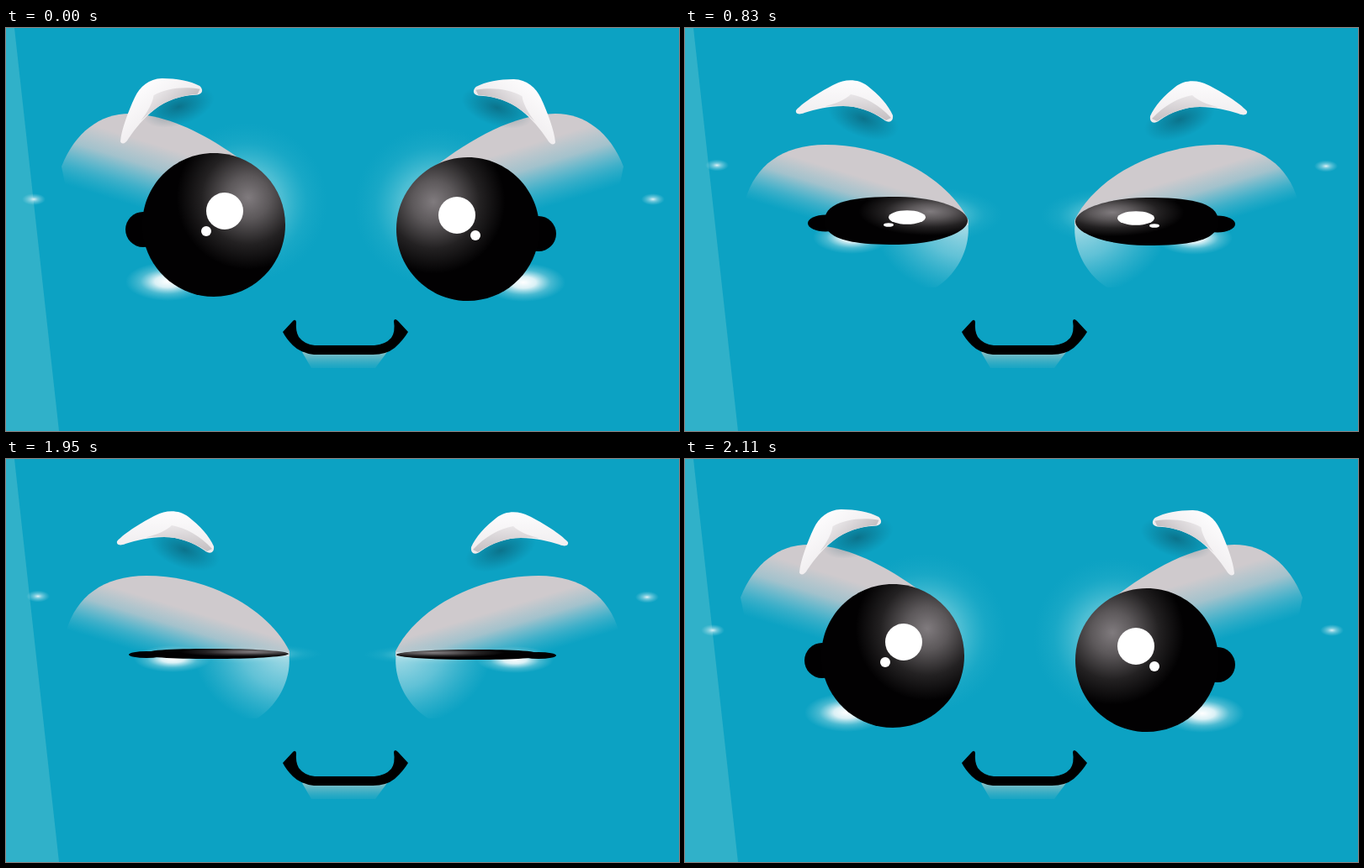
Animation of 800 by 480 pixels, one loop 2740 ms. Source, as an HTML page:

```html
<!DOCTYPE html>
<html lang="en">
<head>
<meta charset="utf-8">
<title>Blinking face</title>
<style>
  html, body { margin: 0; width: 100%; height: 100%; overflow: hidden; background: #0ca2c3; }
  svg { display: block; width: 100vw; height: 100vh; }
</style>
</head>
<body>
<svg viewBox="0 0 800 480" xmlns="http://www.w3.org/2000/svg">
  <defs>
    <radialGradient id="ball" cx=".74" cy=".31" r=".5">
      <stop offset="0" stop-color="#807b7e"/>
      <stop offset=".3" stop-color="#5c585a"/>
      <stop offset=".65" stop-color="#232122"/>
      <stop offset="1" stop-color="#020102"/>
    </radialGradient>
    <radialGradient id="halo">
      <stop offset="0" stop-color="#a5e2e8" stop-opacity=".8"/>
      <stop offset=".45" stop-color="#8ad8e2" stop-opacity=".5"/>
      <stop offset=".75" stop-color="#5cc8d8" stop-opacity=".15"/>
      <stop offset="1" stop-color="#3cbbd0" stop-opacity="0"/>
    </radialGradient>
    <radialGradient id="shine">
      <stop offset="0" stop-color="#fff"/>
      <stop offset=".3" stop-color="#fff" stop-opacity=".85"/>
      <stop offset=".65" stop-color="#e8f6f6" stop-opacity=".28"/>
      <stop offset="1" stop-color="#c0e8ec" stop-opacity="0"/>
    </radialGradient>
    <radialGradient id="glint">
      <stop offset="0" stop-color="#f4fbfc" stop-opacity=".9"/>
      <stop offset=".35" stop-color="#d8eff4" stop-opacity=".5"/>
      <stop offset="1" stop-color="#a0dce8" stop-opacity="0"/>
    </radialGradient>
    <radialGradient id="under" gradientUnits="userSpaceOnUse" cx="0" cy="0" r="1"
      gradientTransform="translate(338 228) scale(115 92)">
      <stop offset="0" stop-color="#dceff2" stop-opacity=".8"/>
      <stop offset=".5" stop-color="#c8e8ee" stop-opacity=".45"/>
      <stop offset="1" stop-color="#90d4e0" stop-opacity="0"/>
    </radialGradient>
    <radialGradient id="shade">
      <stop offset="0" stop-color="#0a2c38" stop-opacity=".4"/>
      <stop offset=".5" stop-color="#0a3c4c" stop-opacity=".22"/>
      <stop offset="1" stop-color="#0a4c60" stop-opacity="0"/>
    </radialGradient>
    <linearGradient id="brow" x1="0" y1="0" x2="0" y2="1">
      <stop offset="0" stop-color="#fdfcfd"/>
      <stop offset="1" stop-color="#eeebed"/>
    </linearGradient>
    <linearGradient id="fold" x1="0" y1="0" x2=".1" y2="1">
      <stop offset="0" stop-color="#eae7e9"/>
      <stop offset="1" stop-color="#c6c1c4"/>
    </linearGradient>
    <linearGradient id="chin" x1="0" y1="0" x2="0" y2="1">
      <stop offset="0" stop-color="#a2c6c6" stop-opacity=".85"/>
      <stop offset="1" stop-color="#40b0c6" stop-opacity=".25"/>
    </linearGradient>
  </defs>
  <rect width="800" height="480" fill="#0ca2c3"/>
  <path d="M0 0H10L63 480H0Z" fill="#30b1c9"/>
  <g id="face"></g>
  <path d="M352 386H453L439 405H363Z" fill="url(#chin)"/>
  <path d="M329 362L341 349Q344 346 345 350Q344 361 348 368Q355 377 367 378H438Q451 377 458 369Q463 362 461 349Q462 345 466 349L478 362Q472 372 462 381Q452 389 436 389H366Q350 387 341 378Q333 370 329 362Z"/>
</svg>
<script>
const face = document.getElementById('face');

// Coordinates describe the left half; `r` holds the adjustments for the mirrored half.
const open = {
  eye: [247, 234.5, 85.5, .552, .552], bump: [5.5, 21], hi: [-16.5, 22, 7.5, 6],
  halo: [38, -27, 97, 95], brow: [185, 104.5, -38], glow: [192, 302, 50, 23], spark: [33, 204],
  lid: 'M66 165C82 124 112 102 147 102C200 103 255 136 304 176V200L80 235Z',
  fade: [150, 130, 127, 204], low: 0,
  r: { eye: [4, 5], brow: [11, 1], glow: [-7, 1], spark: [-2, 0] }
};
const half = {
  eye: [251, 235.5, 68.5, .552, .552], bump: [4.5, 17], hi: [-13.5, 18.5, 6, 5],
  halo: [40, -26, 90, 80], brow: [183.5, 111, -24], glow: [191, 295, 50, 22], spark: [31, 208],
  lid: 'M61 192C72 145 100 114 150 113C217 113 290 152 329 198V235H80Z',
  fade: [150, 140, 128, 216], low: .6,
  r: { eye: [0, 0], brow: [11, 1], glow: [2, 1], spark: [7, 0] }
};
const narrow = {
  eye: [251, 229.5, 28.5, .5, .85], bump: [3, 10], hi: [-4, 8.3, 5, 2.3],
  halo: [40, -7, 86, 33], brow: [189.5, 104, 0], glow: [198, 249, 46, 20], spark: [38, 163.5],
  lid: 'M72 204C83 165 115 139 167 139C240 139 312 178 337 229V235H80Z',
  fade: [165, 164, 146, 226], low: 1,
  r: { eye: [0, 1], brow: [0, 1], glow: [-3, 1], spark: [0, 1] }
};
const shut = {
  ...narrow, eye: [251, 232, 6, .5, .85], bump: [1, 4], hi: [0, 0, 0, 0],
  halo: [40, 0, 84, 12], glow: [198, 238, 46, 16]
};

const oval = (x, y, rx, ry, fill, extra = '') =>
  `<ellipse cx="${x}" cy="${y}" rx="${rx}" ry="${ry}" fill="${fill}" ${extra}/>`;

// `tip` and `back` set how full the inner and outer ends are.
function eyePath(x, y, ry, tip, back) {
  const rx = 85, k = .552 * rx, l = x - rx, r = x + rx, t = y - ry, b = y + ry;
  return `M${r} ${y}C${r} ${y - tip * ry} ${x + k} ${t} ${x} ${t}` +
    `S${l} ${y - back * ry} ${l} ${y}S${x - k} ${b} ${x} ${b}S${r} ${y + tip * ry} ${r} ${y}Z`;
}

function eye(p) {
  const [x, y] = p.eye, [h1, r1, h2, r2] = p.hi;
  return oval(x - 84, y + p.bump[0], 21, p.bump[1], '#010001') +
    `<path d="${eyePath(...p.eye)}" fill="url(#ball)"/>` +
    oval(x + 13, y + h1, 22, r1, '#fff') + oval(x - 9, y + h2, 6, r2, '#fff');
}

function brow([x, y, turn]) {
  return `<g transform="translate(${x} ${y}) rotate(${turn}) translate(-189.5 -104)">` +
    oval(212, 108, 44, 22, 'url(#shade)', 'transform="rotate(20 212 108)"') +
    '<path fill="url(#brow)" d="M132 98C141 88 162 75 178 67C190 61 205 60 217 69C230 79 242 92 247 104' +
    'C248 112 242 114 236 109C222 99 205 93 188 93C170 93 155 97 142 101C135 104 131 102 132 98Z"/>' +
    '<path fill="url(#fold)" d="M166 93.500C180 90 191 85 197 79C214 82 230 91 245 107L239 110' +
    'C222 99 205 93 188 93Q177 92 166 93.500Z"/></g>';
}

function side(p, mirrored) {
  const at = (key, art) => `<g transform="translate(${mirrored ? p.r[key] : '0 0'})">${art}</g>`;
  const [x, y] = p.eye, [hx, hy, hrx, hry] = p.halo;
  return at('eye', oval(x + hx, y + hy, hrx, hry, 'url(#halo)')) +
    `<path d="${p.lid}" fill="url(#lid)"/>` +
    `<path d="M336 230C341 262 322 295 298 309H180V235Z" fill="url(#under)" opacity="${p.low}"/>` +
    at('glow', oval(...p.glow, 'url(#shine)')) +
    at('spark', oval(...p.spark, 14, 7, 'url(#glint)')) +
    at('eye', eye(p)) + at('brow', brow(p.brow));
}

function draw(p) {
  const [x1, y1, x2, y2] = p.fade;
  face.innerHTML =
    `<linearGradient id="lid" gradientUnits="userSpaceOnUse" x1="${x1}" y1="${y1}" x2="${x2}" y2="${y2}">
      <stop offset="0" stop-color="#cfcacd"/>
      <stop offset=".35" stop-color="#cdcbcf" stop-opacity=".78"/>
      <stop offset=".7" stop-color="#b8d0d8" stop-opacity=".3"/>
      <stop offset="1" stop-color="#80ccd8" stop-opacity="0"/>
    </linearGradient>` +
    side(p, false) +
    `<g transform="translate(800 0) scale(-1 1)">${side(p, true)}</g>`;
}

const loop = 2740, blinks = [670, 1890];
const steps = [[0, half], [30, narrow], [60, shut], [160, narrow], [190, half], [220, open]];

function poseAt(t) {
  let pose = open;
  for (const start of blinks)
    for (const [delay, next] of steps)
      if (t >= start + delay) pose = next;
  return pose;
}

let shown;
function tick() {
  const pose = poseAt(performance.now() % loop);
  if (pose !== shown) draw(shown = pose);
  requestAnimationFrame(tick);
}
tick();
</script>
</body>
</html>
```
